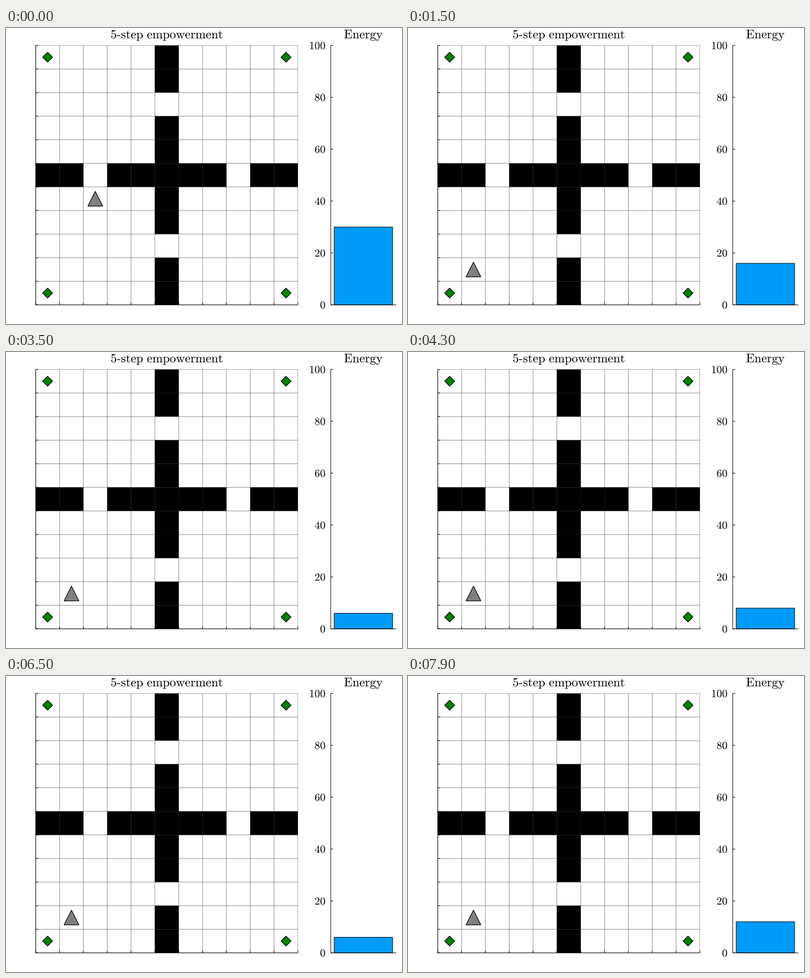
Write a matplotlib script that moves like this. It is 800 px wide and 600 px high and loops after 8 s.

```python
import matplotlib.pyplot as plt
from matplotlib.animation import FuncAnimation
from matplotlib.patches import PathPatch, Polygon, Rectangle
from matplotlib.textpath import TextPath
from matplotlib.transforms import Affine2D

plt.rcParams["mathtext.fontset"] = "cm"
plt.rcParams["path.snap"] = False

PT = 0.72  # points per pixel at 100 dpi
N = 11
LEFT, RIGHT, TOP, BASE = 60.0, 589.75, 35.3, 561.2
CW, CH = (RIGHT - LEFT) / N, (BASE - TOP) / N
FRAMES = 80
HOME, FOOD = (1, 9), (0, 10)
START = [(2, 6), (3, 7), (2, 8)]

fig = plt.figure(figsize=(8, 6), dpi=100, facecolor="white")
ax = fig.add_axes([0, 0, 1, 1])
ax.set_xlim(0, 800)
ax.set_ylim(600, 0)
ax.axis("off")
frame = Rectangle((LEFT, TOP), RIGHT - LEFT, BASE - TOP,
                  transform=ax.transData)


def center(col, row):
    return LEFT + (col + 0.5) * CW, TOP + (row + 0.5) * CH


def line(x0, y0, x1, y1, color="black", width=1.1, z=4, alpha=1):
    return ax.plot([x0, x1], [y0, y1], color=color, lw=width * PT,
                   alpha=alpha, zorder=z, solid_capstyle="butt")[0]


def label(x, y, text, size, anchor=0.5):
    """Outline text on baseline y; anchor 0.5 centres it, 1 right-aligns."""
    path = TextPath((0, 0), text, size=size)
    box = path.get_extents()
    dx = x - box.x0 - anchor * box.width
    flip = Affine2D().scale(1, -1).translate(dx, y)
    ax.add_patch(PathPatch(path.transformed(flip), fc="black", lw=0, zorder=5))


def shape(points, color, z):
    return ax.add_patch(Polygon(points, closed=True, fc=color, ec="black",
                                lw=1.3 * PT, joinstyle="miter", zorder=z))


def triangle(col, row):
    x, y = center(col, row)
    return [(x, y - 15), (x + 15, y + 15), (x - 15, y + 15)]


# Walls with four doorways
doors = {(2, 5), (8, 5), (5, 2), (5, 8)}
walls = {(5, i) for i in range(N)} | {(i, 5) for i in range(N)}
for col, row in walls - doors:
    ax.add_patch(Rectangle((LEFT + col * CW, TOP + row * CH), CW, CH,
                           fc="black", lw=0, zorder=1))

# Grid, frame and inward ticks
for i in range(N + 1):
    x, y = LEFT + i * CW, TOP + i * CH
    for ends in ((x, TOP, x, BASE), (LEFT, y, RIGHT, y)):
        line(*ends, color="0.1", width=1, z=2, alpha=0.55).set_clip_path(frame)
    line(x, BASE, x, BASE - 5, z=3)
    line(LEFT, y, LEFT + 5, y, z=3)
line(LEFT, TOP, LEFT, BASE)
line(LEFT, BASE, RIGHT, BASE)

for col in (0, N - 1):
    for row in (0, N - 1):
        x, y = center(col, row)
        r = 10.1
        shape([(x, y - r), (x + r, y), (x, y + r), (x - r, y)], "#008000", 5)

# Energy gauge
UNIT = (BASE - TOP) / 100
line(656, TOP, 656, BASE)
line(656, BASE, 788.5, BASE)
for v in range(0, 101, 20):
    y = BASE - v * UNIT
    line(656, y, 661, y)
    label(644.5, y + 7.5, rf"$\mathrm{{{v}}}$", 22, 1)
label(324.8, 21, r"$\text{5-step}\ \mathrm{empowerment}$", 25.2)
label(722, 21, r"$\mathrm{Energy}$", 25.2)

bar = ax.add_patch(Rectangle((663, BASE), 118, 0, fc="#009afa", ec="black",
                             lw=1.1 * PT, zorder=3))
agent = shape(triangle(*START[0]), "#808080", 6)


def position(i):
    if i < len(START):
        return START[i]
    return FOOD if i >= 26 and i % 10 == 6 else HOME


def energy(i):
    """The gauge trails the agent by one step; each meal adds 10."""
    meals = max(0, (i - 17) // 10)
    return 30 - max(0, i - 1) + 10 * meals


def update(i):
    h = energy(i) * UNIT
    bar.set_y(BASE - h)
    bar.set_height(h)
    agent.set_xy(triangle(*position(i)))
    return bar, agent


anim = FuncAnimation(fig, update, frames=FRAMES, interval=100,
                     repeat=True, repeat_delay=0, blit=False)
plt.show()
```
